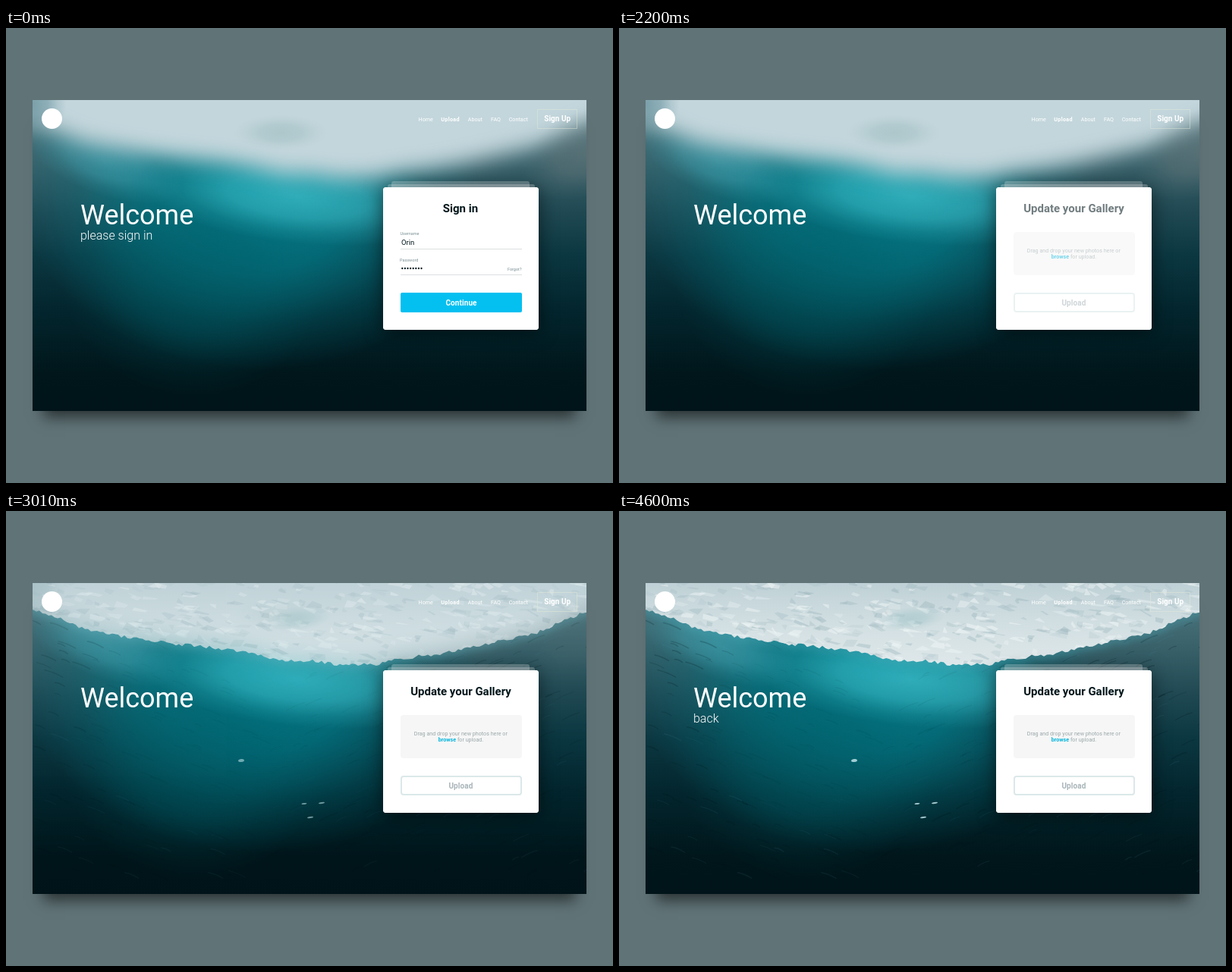
An HTML page with a canvas that plays this animation: 800 px wide and 600 px high, repeating every 6.23 s.

```html
<!DOCTYPE html>
<html lang="en">
<head>
<meta charset="utf-8">
<title>Sign in</title>
<style>
  html, body { margin: 0; width: 100%; height: 100%; overflow: hidden; background: #607377; }
  #stage { position: relative; width: 800px; height: 600px; overflow: hidden; }
  #window {
    position: absolute; left: 35px; top: 95px; width: 730px; height: 410px;
    background: #00151a; box-shadow: 0 22px 18px -14px rgba(0, 0, 0, .58);
  }
  canvas { position: absolute; left: 0; top: 0; }
  svg { position: absolute; left: 0; top: 0; font-family: Roboto, "Open Sans", sans-serif; }
  .mid { text-anchor: middle; }
  .bold { font-weight: 700; }
  .nav { font-size: 7.2px; fill: #fff; }
  .sub { font-size: 16px; font-weight: 300; fill: #fff; }
  .title { font-size: 15px; font-weight: 700; fill: #00151a; }
  .label { font-size: 5.5px; fill: #7b9095; }
  .hint { font-size: 7.16px; fill: #9aa7aa; }
  .button { font-size: 10px; font-weight: 700; letter-spacing: .1px; }
  #cardShadow { filter: drop-shadow(0 2px 12px rgba(0, 0, 0, .55)); }
  #line { transform-box: fill-box; transform-origin: left center; }
</style>
</head>
<body>
<div id="stage">
  <div id="window">
    <canvas id="soft" width="730" height="410"></canvas>
    <canvas id="sharp" width="730" height="410"></canvas>
  </div>
  <svg width="800" height="600" viewBox="0 0 800 600">
    <circle cx="60.5" cy="119.5" r="13.5" fill="#fff"/>
    <g class="nav">
      <text x="543.6" y="122.6">Home</text>
      <text x="573.3" y="122.6" class="bold" letter-spacing=".3">Upload</text>
      <text x="608.7" y="122.6">About</text>
      <text x="639" y="122.6">FAQ</text>
      <text x="662.7" y="122.6">Contact</text>
    </g>
    <rect x="700.5" y="107.5" width="52" height="25" fill="none" stroke="#e6ead8" stroke-opacity=".45"/>
    <text x="709.3" y="122.8" class="bold" font-size="10" fill="#fff">Sign Up</text>

    <text x="98" y="259" font-size="36" fill="#fff">Welcome</text>
    <text id="ask" x="98" y="279" class="sub">please sign in</text>
    <text id="back" x="98" y="279" class="sub">back</text>

    <rect id="cardShadow" x="497" y="210" width="205" height="188" rx="4" fill="#fff"/>
    <rect x="508" y="202" width="182" height="20" rx="3" fill="#fff" fill-opacity=".24"/>
    <rect x="503" y="206" width="194" height="20" rx="3" fill="#fff" fill-opacity=".24"/>
    <rect x="497" y="210" width="205" height="188" rx="4" fill="#fff"/>

    <g id="form">
      <text x="599" y="243" class="title mid">Sign in</text>
      <text x="519.5" y="273" class="label">Username</text>
      <text x="521" y="286" font-size="9.5" fill="#00151a">Orin</text>
      <text x="519" y="308" class="label">Password</text>
      <g id="dots" fill="#00151a"></g>
      <text x="679.5" y="320" class="label" text-anchor="end">Forgot?</text>
      <path d="M520 291.5H680M520 325.5H680" stroke="#dcdfe0"/>
      <rect id="go" x="520" y="349" width="160" height="26" rx="2" fill="#03c0f1"/>
      <text x="600" y="366" class="button mid" fill="#fff">Continue</text>
    </g>

    <rect id="line" x="520" y="297" width="160" height="2" fill="#06bfe0"/>

    <g id="gallery">
      <text x="599.5" y="243" class="title mid">Update your Gallery</text>
      <rect x="520" y="269" width="160" height="57" rx="4" fill="#f6f6f6"/>
      <text x="599.3" y="296" class="hint mid">Drag and drop your new photos here or</text>
      <text x="599.5" y="304" class="hint mid"><tspan class="bold" fill="#03b5dc">browse</tspan> for upload.</text>
      <rect x="521" y="350" width="158" height="24" rx="3" fill="none" stroke="#dbe8e9" stroke-width="2"/>
      <text x="599.5" y="366" class="button mid" fill="#a9b5b9">Upload</text>
    </g>
  </svg>
</div>
<script>
const LOOP = 6230;
const byId = id => document.getElementById(id);

let seed = 11;
const rand = () => (seed = (seed * 16807) % 2147483647) / 2147483647;
const between = (a, b) => a + (b - a) * rand();

const SHORE = [
  [0, 122], [35, 130], [62, 138], [100, 155], [140, 163], [190, 171], [240, 177], [290, 182],
  [335, 190], [365, 198], [400, 197], [440, 203], [490, 202], [515, 195], [560, 190],
  [600, 183], [640, 174], [700, 160], [740, 143], [765, 132], [810, 116]
];

function shoreY(x) {
  const i = Math.max(1, SHORE.findIndex(p => p[0] >= x));
  const [x0, y0] = SHORE[i - 1], [x1, y1] = SHORE[i];
  return y0 + (y1 - y0) * (x - x0) / (x1 - x0);
}

function icePath(step, rough, lift) {
  const p = new Path2D();
  p.moveTo(0, 20);
  for (let x = 0; x <= 810; x += step) p.lineTo(x, shoreY(x) - lift + between(-rough, rough));
  p.lineTo(810, 20);
  p.closePath();
  return p;
}

function fade(g, stops) {
  stops.forEach(([at, colour]) => g.addColorStop(at, colour));
  return g;
}

function glow(c, x, y, rx, ry, turn, rgb, alpha) {
  c.save();
  c.translate(x, y);
  c.rotate(turn);
  c.scale(rx, ry);
  c.fillStyle = fade(c.createRadialGradient(0, 0, 0, 0, 0, 1), [
    [0, `rgba(${rgb},${alpha})`], [.45, `rgba(${rgb},${alpha * .72})`],
    [.75, `rgba(${rgb},${alpha * .25})`], [1, `rgba(${rgb},0)`]
  ]);
  c.fillRect(-1, -1, 2, 2);
  c.restore();
}

function water(c) {
  c.fillStyle = fade(c.createLinearGradient(0, 95, 0, 505), [
    [0, '#537d86'], [.2, '#3a626b'], [.36, '#1f4852'], [.5, '#0b3741'],
    [.68, '#03252d'], [.88, '#00161b'], [1, '#001419']
  ]);
  c.fillRect(0, 0, 800, 600);
  glow(c, 320, 215, 310, 235, .1, '0,128,142', .95);
  glow(c, 245, 320, 175, 165, .2, '0,92,102', .5);
  glow(c, 130, 175, 110, 45, .35, '75,170,185', .55);
  glow(c, 385, 222, 210, 62, .1, '60,190,202', .75);
}

function scene(id, paint) {
  const c = byId(id).getContext('2d');
  c.translate(-35, -95);
  water(c);
  paint(c);
}

scene('soft', c => {
  c.filter = 'blur(14px)';
  c.fillStyle = '#c3d6dc';
  c.fill(icePath(15, 0, 4));
  c.filter = 'none';
  glow(c, 362, 138, 62, 24, 0, '150,184,186', .5);
  glow(c, 35, 100, 45, 45, 0, '75,125,137', .6);
  glow(c, 765, 165, 90, 55, -.4, '110,122,124', .5);
});

function ripples(c) {
  c.lineCap = 'round';
  for (let i = 0; i < 420; i++) {
    const x = between(25, 765), y = between(140, 480);
    const inGlow = Math.hypot((x - 310) / 215, (y - 275) / 150) < 1;
    const turn = x < 330 ? .38 : -.42, len = between(8, 26);
    const dx = Math.cos(turn) * len, dy = Math.sin(turn) * len;
    c.strokeStyle = rand() < .7 ? `rgba(0,18,26,${inGlow ? .05 : .2})`
                                : `rgba(90,160,172,${inGlow ? .04 : .09})`;
    c.lineWidth = between(.7, 1.8);
    c.beginPath();
    c.moveTo(x, y);
    c.quadraticCurveTo(x + dx / 2, y + dy / 2 - 2, x + dx, y + dy);
    c.stroke();
  }
}

function facets(c) {
  for (let i = 0; i < 520; i++) {
    const x = between(30, 770), y = between(90, 205), w = between(3, 13), h = between(1.5, 5);
    c.fillStyle = rand() < .5 ? `rgba(240,246,247,${between(.2, .55)})`
                              : `rgba(145,174,181,${between(.12, .36)})`;
    c.beginPath();
    c.moveTo(x - w, y + between(-h, h));
    c.lineTo(x + between(-w, 0), y - h);
    c.lineTo(x + w, y + between(-h, h));
    c.lineTo(x + between(0, w), y + h);
    c.fill();
  }
}

scene('sharp', c => {
  ripples(c);
  const ice = icePath(4, 2.2, 0);
  c.filter = 'blur(5px)';
  c.strokeStyle = 'rgba(75,170,182,.4)';
  c.lineWidth = 10;
  c.stroke(ice);
  c.filter = 'none';
  c.save();
  c.clip(ice);
  c.fillStyle = fade(c.createLinearGradient(0, 95, 0, 205), [[0, '#bfd1d6'], [.5, '#d2dfe2'], [1, '#dfe8ea']]);
  c.fillRect(0, 0, 800, 300);
  facets(c);
  glow(c, 385, 142, 45, 16, -.1, '150,190,194', .5);
  c.restore();
  c.fillStyle = 'rgba(190,225,230,.85)';
  [[310, 329, 4, 2], [393, 386, 3.5, .9], [416, 385, 4, .9], [401, 404, 4, 1]].forEach(([x, y, rx, ry]) => {
    c.beginPath();
    c.ellipse(x, y, rx, ry, -.15, 0, 7);
    c.fill();
  });
});

byId('dots').innerHTML = Array.from({ length: 8 }, (_, i) =>
  `<circle cx="${522.3 + i * 3.6}" cy="317" r="1.15"/>`).join('');

// Each step: time in ms, value, easing towards the next step.
const TRACKS = [
  ['go', 'fill', [[530, '#03c0f1', 'ease-out'], [740, '#02a6d6', 'ease-in'], [950, '#03c0f1']]],
  ['form', 'opacity', [[1120, 1, 'ease-in-out'], [1420, 0]]],
  ['ask', 'opacity', [[1380, 1], [1800, 0]]],
  ['line', 'transform', [[1370, 'scaleX(0)', 'ease-in-out'], [1850, 'scaleX(1)']]],
  ['line', 'opacity', [[1900, 1], [2050, 0]]],
  ['gallery', 'opacity', [[1950, 0], [2400, 1]]],
  ['sharp', 'opacity', [[2200, 0, 'ease'], [4240, 1]]],
  ['back', 'opacity', [[3000, 0], [4600, 1]]]
];

for (const [id, prop, steps] of TRACKS) {
  const all = [[0, steps[0][1]], ...steps, [LOOP, steps[steps.length - 1][1]]];
  const frames = all.map(([ms, value, easing = 'linear']) => ({ offset: ms / LOOP, [prop]: value, easing }));
  byId(id).animate(frames, { duration: LOOP, iterations: Infinity });
}
</script>
</body>
</html>
```
